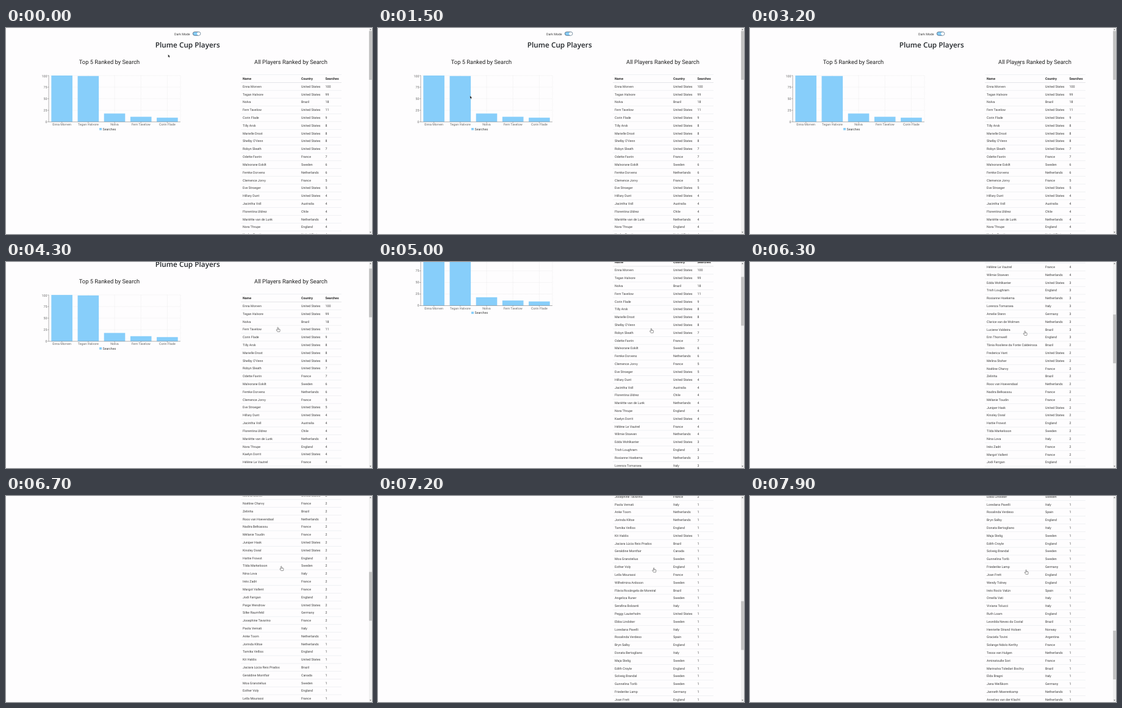
These frames come from a looping animation (600 by 338 pixels, 8000 ms). An HTML page:

```html
<!DOCTYPE html>
<html lang="en">
<head>
<meta charset="utf-8">
<title>Plume Cup Players</title>
<style>
  html, body { margin: 0; width: 100%; height: 100%; overflow: hidden; background: #fefdfe; }
  svg { display: block; width: 600px; height: 338px; }
  text { font: 5.3px Roboto, sans-serif; fill: #3c3c3c; text-rendering: geometricPrecision; }
  .title { font: 600 11.8px "Open Sans", sans-serif; fill: #212529; }
  .heading { font-size: 9.37px; fill: #222; }
  .head { font-weight: 700; fill: #222; }
  .tick { fill: #666; }
  .mid { text-anchor: middle; }
  .end { text-anchor: end; }
</style>
</head>
<body>
<svg viewBox="0 0 600 338">
  <g id="page">
    <text x="276" y="11.8">Dark Mode</text>
    <rect x="306.4" y="6.4" width="12.4" height="5.8" rx="2.9" fill="#87cefa" stroke="#445566" stroke-width=".8"/>
    <circle cx="315.8" cy="9.3" r="2.6" fill="#fff"/>
    <text class="title mid" x="297.7" y="32">Plume Cup Players</text>
    <text class="heading mid" x="169.5" y="59">Top 5 Ranked by Search</text>
    <text class="heading mid" x="467" y="59">All Players Ranked by Search</text>
  </g>
  <g>
    <rect x="595" width="5" height="338" fill="#f1f1f1"/>
    <path d="M596.2 3.2l1.3-1.6 1.3 1.6zM596.2 334.6l1.3 1.6 1.3-1.6z" fill="#555"/>
    <rect id="thumb" x="595.2" y="5" width="4.6" height="80" fill="#c1c1c1"/>
  </g>
  <path id="arrow" d="M0 0v4.6l1.1-1 .7 1.7.8-.3-.7-1.7h1.5z" fill="#111" stroke="#fff" stroke-width=".25"/>
  <path id="hand" d="M-.7.6Q0-.4.7.6V2.8L3.3 3.4Q3.8 3.6 3.7 4.4L3.2 7.4H-.6L-2.4 4.7Q-2.4 3.8-1.6 4L-.7 4.7ZM.7 2.8v1M2 3.1v.9" fill="#fff" stroke="#333" stroke-width=".5"/>
</svg>
<script>
const COUNTRIES = {
  us: 'United States', br: 'Brazil', fr: 'France', se: 'Sweden', nl: 'Netherlands', au: 'Australia', cl: 'Chile',
  en: 'England', it: 'Italy', de: 'Germany', ca: 'Canada', es: 'Spain', no: 'Norway', ar: 'Argentina'
};
const PLAYERS = `us Enna Morven|us Tegan Halvore|br Nolva|us Fern Tavelow|us Corin Flade|us Tilly Arsk
us Marielle Drost|us Shelby O'Venn|us Robyn Sleath|fr Odette Favrin|se Malvorane Eskilt|nl Femke Dorvens
fr Clemence Jorvy|us Eve Stroeger|us Hillary Dunt|au Jacintha Voll|cl Florentina Uldrez|nl Mariëtte van de Lunk
en Nora Thrupe|us Kaelyn Dorrit|fr Hélène Le Vautrel|nl Wilmie Stoeven|us Edda Wohlkanter|en Trish Loughram
nl Rosianne Hoekema|it Lorenza Tomarsea|de Amelie Stenn|nl Clarice van de Wolmen|br Luciene Valdeira
en Erin Thornwell|br Tânia Rosilene da Fonte Caldeirosa|us Frederica Vant|us Melina Stoher|fr Noëline Charvy
br Zelinha|nl Roos van Hoevendaal|fr Nadira Belkassou|fr Mélanie Toudin|us Juniper Hask|us Kinsley Doral
en Hattie Frowst|se Tilda Markelsson|it Nina Lova|fr Inès Zadri|fr Margot Vallent|en Jodi Farrgan
us Paige Wendrow|de Silke Raumfeld|fr Josephine Tavarino|it Paola Vernati|nl Anke Toorn|nl Jorinda Klitse
en Tamika Velliss|us Kit Haldis|br Jaciara Lúcia Reis Prados|ca Geraldine Montfair|se Moa Granstelius
en Esther Voly|fr Leïla Mourassi|se Wilhelmina Ardsson|br Flávia Rosângela de Moreiral|se Angelica Runer
it Serafina Bolzanti|us Peggy Lauterholm|se Ebba Lindsker|it Loredana Pavelli|es Rosalinda Verdeso|en Bryn Salby
it Donata Bertogliano|se Maja Stelig|en Edith Croyle|se Solveig Brandal|se Gunnelina Torlö|de Friederike Lamp
en Joan Frett|en Wendy Tolney|es Inés Rocío Valún|it Ornella Vati|it Viviana Tolucci|en Ruth Loam
br Leonilda Neves da Costal|no Henriette Strand Holsen|ar Graciela Tovini|fr Solange Ndolo Kerthy
nl Tessa van Hulgen|fr Aminatoulle Sori|br Marinalva Toledari Bochry|it Elda Bragni|de Jana Weißkorn
nl Janneth Moerenkamp|nl Annelies van der Klacht|es Nuria Callades|fr Maëlle Drouvin`
  .split(/[|\n]/).map(s => [s.slice(3), COUNTRIES[s.slice(0, 2)]]);
const TOP_SCORES = [100, 99, 18, 11, 9, 8, 8, 8, 7, 7, 6, 6, 5, 5];
const score = i => TOP_SCORES[i] ?? (i < 22 ? 4 : i < 30 ? 3 : i < 49 ? 2 : 1);

const ROW = 12.8125, PLOT = { left: 70, right: 286, top: 78, bottom: 154 };
const text = (x, y, s, cls = '') => `<text x="${x}" y="${y}" class="${cls}">${s}</text>`;
const rect = (x, y, w, h, fill) => `<rect x="${x}" y="${y}" width="${w}" height="${h}" fill="${fill}"/>`;
const line = (x1, y1, x2, y2, color, extra = '') =>
  `<path d="M${x1} ${y1}L${x2} ${y2}" stroke="${color}" stroke-width=".5" ${extra}/>`;

function chart() {
  const { left, right, top, bottom } = PLOT, height = bottom - top, band = (right - left) / 5;
  const dash = 'stroke-dasharray="1 1"';
  let grid = line(right, top, right, bottom, '#ddd', dash), marks = '';
  for (let v = 0; v <= 100; v += 25) {
    const y = bottom - height * v / 100;
    grid += line(left, y, right, y, '#ddd', dash);
    marks += line(left - 2, y, left, y, '#666') + text(67.5, Math.max(y, 79.5) + 1.9 - (v ? 0 : .3), v, 'tick end');
  }
  for (let i = 0; i < 5; i++) {
    const mid = left + band * (i + .5), h = height * score(i) / 100;
    grid += line(mid, top, mid, bottom, '#ddd', dash);
    marks += rect(mid - 17.3, bottom - h, 34.6, h, '#87cefa') +
      line(mid, bottom, mid, bottom + 1.8, '#666') + text(mid, 160, PLAYERS[i][0], 'tick mid');
  }
  return grid + marks + line(left, top, left, bottom, '#666') + line(left, bottom, right, bottom, '#666') +
    rect(153, 164, 4, 3.6, '#87cefa') + text(158.5, 167.7, 'Searches');
}

function table() {
  const row = (y, cells, cls) => cells.map((s, i) => text([388, 484, 523.5][i], y, s, cls)).join('');
  const rule = (y, color) => line(385, y, 550, y, color);
  return rule(76.6, '#dee2e6') + row(84.8, ['Name', 'Country', 'Searches'], 'head') + rule(89.5, '#c8ccd0') +
    PLAYERS.map((p, i) => row(97.8 + i * ROW, [...p, score(i)]) + rule(102.4 + i * ROW, '#dee2e6')).join('');
}

// Key poses: time in ms followed by values
const SCROLL = [[4200, 0], [4600, 62.5], [4950, 62.5], [5440, 187.5], [5650, 187.5], [6300, 344], [7200, 710], [8000, 944.3]];
const POINTER = [[0, 265.7, 43.5], [250, 261, 25], [600, 337, 80], [850, 300, 140], [1000, 279, 130], [1800, 74, 100],
  [1900, 72, 115], [2200, 190, 197], [2500, 425, 60], [2700, 345, 30], [2900, 400, 18], [3200, 439.3, 54.5],
  [3600, 451, 105], [4300, 445.6, 107], [5400, 449.3, 110], [6300, 450.6, 113], [7200, 452.2, 117.7], [7900, 452.6, 121]];

function sample(keys, t, ease) {
  const next = keys.findIndex(k => k[0] > t);
  if (next < 1) return keys.at(next).slice(1);
  const a = keys[next - 1], b = keys[next], u = ease((t - a[0]) / (b[0] - a[0]), a[0]);
  return a.slice(1).map((v, i) => v + (b[i + 1] - v) * u);
}
const wheel = (u, start) => start < 6300 ? Math.sin(u * Math.PI / 2) : u;
const linear = u => u;

const $ = id => document.getElementById(id);
const move = (id, x, y) => $(id).setAttribute('transform', `translate(${x} ${y})`);
$('page').insertAdjacentHTML('beforeend', chart() + table());

function draw() {
  const t = Math.floor(performance.now() % 8000 / 100) * 100;
  const [scroll] = sample(SCROLL, t, wheel), [x, y] = sample(POINTER, t, linear);
  const hand = x > 388;
  move('page', 0, -scroll);
  move('thumb', 0, scroll * .236);
  move('arrow', x, y);
  move('hand', x, y);
  $('arrow').style.display = hand ? 'none' : '';
  $('hand').style.display = hand ? '' : 'none';
  requestAnimationFrame(draw);
}
draw();
</script>
</body>
</html>
```
